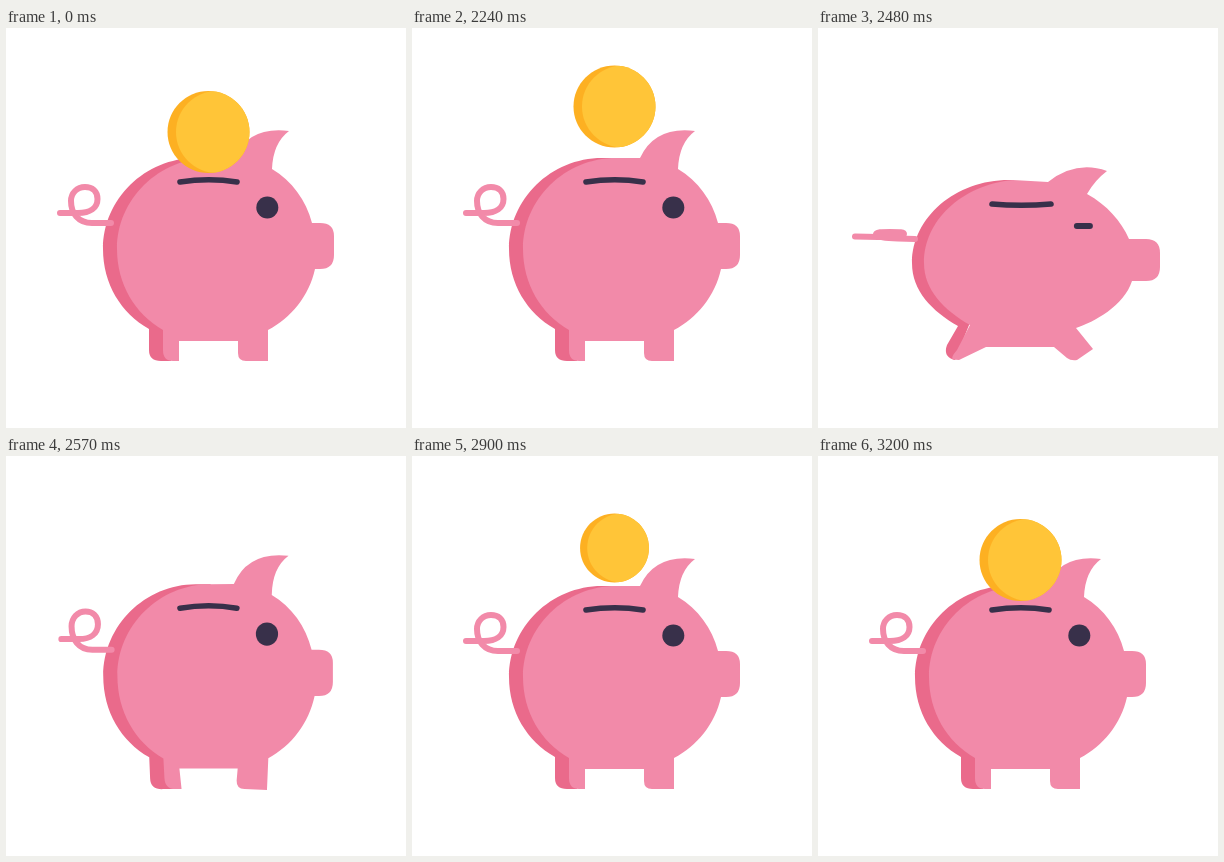
Write an HTML page that moves like this. It is 400x400 px and loops after 3.29 s.

```html
<!DOCTYPE html>
<html lang="en">
<head>
<meta charset="utf-8">
<title>Piggy bank</title>
<style>
html, body { margin: 0; width: 100%; height: 100%; overflow: hidden; background: #fff; }
svg { display: block; width: 100vw; height: 100vh; }
</style>
</head>
<body>
<svg viewBox="0 0 400 400">
  <defs>
    <clipPath id="above"><rect id="aboveBox" width="400"/></clipPath>
    <clipPath id="rim"><path id="rimShape"/></clipPath>
  </defs>
  <path id="shade" fill="#ea6a8b"/>
  <path id="body" fill="#f28aa9"/>
  <path id="tail" fill="none" stroke="#f28aa9" stroke-width="6" stroke-linecap="round" stroke-linejoin="round"/>
  <rect id="eye" fill="#38304a"/>
  <g clip-path="url(#above)">
    <g id="coin">
      <path id="edge" fill="#fdb022"/>
      <g clip-path="url(#rim)"><path id="face" fill="#ffc538"/></g>
    </g>
  </g>
  <path id="slot" fill="none" stroke="#38304a" stroke-width="5.6" stroke-linecap="round"/>
</svg>
<script>
const LOOP = 3290, STEP = 30, START = 2030;
const $ = id => document.getElementById(id);
const mix = (a, b, k) => a + (b - a) * k;

// Each shape: relaxed pose, squashed pose
const shapes = {
  shade: [
    'M190 130C139 130 97 171 97 221C97 256 115 285 143 301L143 322Q143 333 155 333L165 333L190 200L204 130Z',
    'M195 152C140 150 94 188 94 235C94 263 114 283 140 298L129 317Q125 328 135 331.5L137 332L190 200L195 152Z'
  ],
  body: [
    'M204 130C153 130 111 171 111 221C111 256 129 286 157 302L157 322Q157 333 167 333L173 333L173 313L232 313' +
    'L232 325Q232 333 240 333L262 333L262 302C285 290 303 268 309 241L314 241Q328 241 328 227L328 208Q328 195 314 195' +
    'L306 195C300 172 286 153 266 141Q267 115 283 103Q243 98 228 130Z',
    'M195 152C143 157 106 193 106 235C106 262 126 282 152 297L139 322Q132 330 135 331.5L141 332L168 319L236 319' +
    'L249 330Q253 333 259 332L275 321L258 300C277 296 288 277 302 271Q312 262 314 253L328 253Q342 253 342 239'.replace(
      'C277 296 288 277 302 271Q312 262 314 253L328 253', 'C276 294 306 278 314 253L328 253') +
    'L342 225Q342 211 328 211L311 211C303 193 289 177 269 166Q277 152 289 143Q258 132 230 154Z'
  ],
  tail: [
    'M54 185L72 185C84 185 91.5 180 91.5 171C91.5 163 86 159 79 159C71 159 65 165 65 173C65 185 72 195 86 195L105 195',
    'M37 208.5L60 209C78 209 86 208 86 206C86 204 82 204 72 204C64 204 58 204 58 206.5C58 209 68 210 80 210.5L97 211'
  ],
  slot: ['M174 154Q203 149.5 231 154', 'M174 176Q203 178.5 233 176'],
  coin: [
    'M161.5 104C161.5 81.4 179.9 63 202.5 63C225.1 63 243.5 81.4 243.5 104C243.5 126.6 225.1 145 202.5 145C179.9 145 161.5 126.6 161.5 104Z',
    'M166.5 107C166.5 87 182.5 71 202.5 71C222.5 71 239 87 239 107C239 130 227 167 203 167C179 167 166.5 130 166.5 107Z'
  ]
};

function morph(name, k) {
  const [from, to] = shapes[name];
  const ends = to.match(/[\d.]+/g);
  let i = 0;
  return from.replace(/[\d.]+/g, n => mix(+n, +ends[i++], k).toFixed(2));
}

// Linear track through [time, value] keys
function track(keys, t) {
  if (t <= keys[0][0]) return keys[0][1];
  for (let i = 1; i < keys.length; i++) {
    const [t0, v0] = keys[i - 1], [t1, v1] = keys[i];
    if (t <= t1) return mix(v0, v1, (t - t0) / (t1 - t0));
  }
  return keys[keys.length - 1][1];
}

const squash = [[2305, 0], [2330, .22], [2360, .69], [2390, 1.15], [2420, 1.41], [2450, 1.28],
  [2480, 1], [2510, .5], [2540, .08], [2570, -.08], [2600, -.11], [2660, -.06], [2740, 0]];
const sink = [[2360, 0], [2390, 50], [2420, 125]];
const grow = [[2780, 0], [2900, .84], [2930, 1]];
const rise = [[2780, 122], [2840, 113], [2870, 104], [2900, 92], [2930, 76], [2960, 62],
  [2990, 57], [3020, 63], [3050, 79], [3080, 96], [3110, 101], [3140, 103.5], [3170, 104]];

function drawPig(q) {
  for (const id of ['shade', 'body', 'tail', 'slot']) $(id).setAttribute('d', morph(id, q));
  const w = mix(22, 19, q), h = Math.max(1, mix(22, 6, q));
  const box = { x: mix(261.3, 265.4, q) - w / 2, y: mix(179.5, 198, q) - h / 2, width: w, height: h, rx: h / 2, ry: h / 2 };
  for (const key in box) $('eye').setAttribute(key, box[key]);
  $('aboveBox').setAttribute('height', mix(152, 177, q));
}

function drawCoin(t) {
  let dy = 0, scale = 1, stretch = 0;
  if (t >= 2780) {
    scale = track(grow, t);
    dy = track(rise, t) - 104;
  } else if (t >= 2000) {
    // Toss upwards, then pulled into the slot
    const u = (t - 2156) / 156;
    stretch = Math.min(1, Math.max(0, (t - 2270) / 90));
    dy = -36 * (1 - u * u) * (1 - stretch) + track(sink, t);
  }
  const shown = scale > 0 && !(t >= 2420 && t < 2780);
  $('coin').style.display = shown ? '' : 'none';
  if (!shown) return;
  const d = morph('coin', stretch);
  for (const id of ['rimShape', 'edge', 'face']) $(id).setAttribute('d', d);
  $('face').setAttribute('transform', `translate(${mix(8.5, 7, stretch)} 0)`);
  $('coin').setAttribute('transform', `translate(202.5 ${104 + dy}) scale(${scale}) translate(-202.5 -104)`);
}

function draw(ms) {
  const t = START + Math.floor((ms % LOOP - START) / STEP) * STEP;
  drawPig(track(squash, t));
  drawCoin(t);
}

let origin = null;
function tick(now) {
  if (origin === null) origin = now;
  draw(Math.max(0, now - origin));
  requestAnimationFrame(tick);
}
draw(0);
requestAnimationFrame(tick);
</script>
</body>
</html>
```
